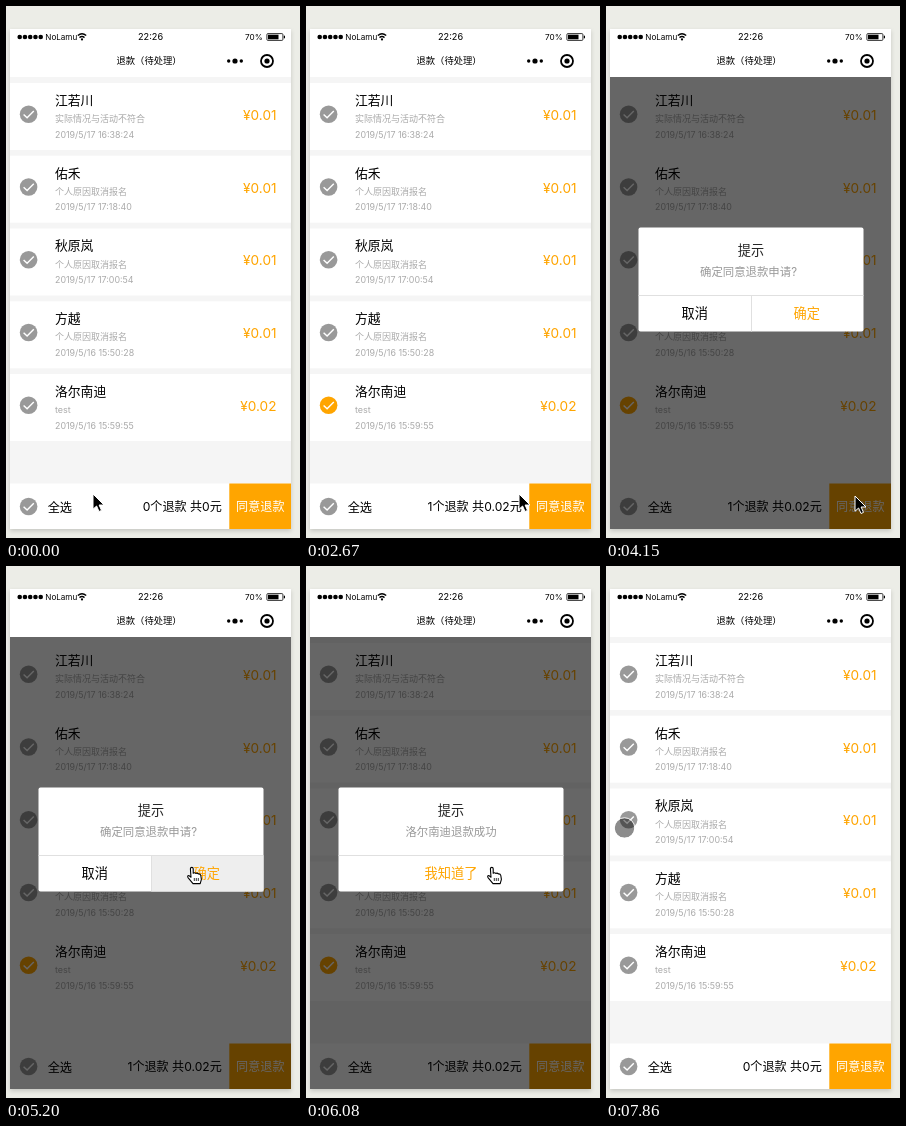
An HTML page that plays this animation: 294x532 px, repeating every 8000 ms.

```html
<!DOCTYPE html>
<html lang="zh-CN">
<head>
<meta charset="utf-8">
<title>退款</title>
<style>
html, body { margin: 0; height: 100%; overflow: hidden; background: #ecede7; }
svg { display: block; width: 294px; height: 532px; }
text { font-family: Inter, "Noto Sans CJK SC", "Noto Sans CJK", sans-serif; white-space: pre; }
#page { filter: drop-shadow(0 2px 2px rgba(0, 0, 0, .16)); }
</style>
</head>
<body>
<svg id="stage" viewBox="0 0 294 532" xmlns="http://www.w3.org/2000/svg"></svg>
<script>
const LOOP = 8000, TICK = 148.15, LAST = 53;
const ORANGE = '#ffa500', GREY = '#999';

const rows = [
  ['江若川', '实际情况与活动不符合', '2019/5/17 16:38:24', '¥0.01'],
  ['佑禾', '个人原因取消报名', '2019/5/17 17:18:40', '¥0.01'],
  ['秋原岚', '个人原因取消报名', '2019/5/17 17:00:54', '¥0.01'],
  ['方越', '个人原因取消报名', '2019/5/16 15:50:28', '¥0.01'],
  ['洛尔南迪', 'test', '2019/5/16 15:59:55', '¥0.02'],
];

// Pointer path: tick, x, y
const path = [
  [0, 87, 488], [1, 86, 488], [2, 86, 488], [3, 86, 486], [9, 25, 398], [10, 24, 396],
  [11, 193.3, 455.3], [13, 214, 484], [18, 213, 488], [20, 213, 488],
  [23, 276, 495], [26, 257, 497], [28, 249, 490], [32, 71, 206], [35, 186, 301],
  [42, 186, 301], [43, 174, 306], [44, 168, 308], [45, 168, 308], [46, 167, 308],
  [49, 167, 308], [53, 18.5, 262],
];

const rect = (x, y, w, h, fill, more = '') =>
  `<rect x="${x}" y="${y}" width="${w}" height="${h}" fill="${fill}" ${more}/>`;
const dot = (x, y, r, fill = '#000', more = '') =>
  `<circle cx="${x}" cy="${y}" r="${r}" fill="${fill}" ${more}/>`;
const label = (s, x, y, size, fill = '#000', anchor = 'start', more = '') =>
  `<text x="${x}" y="${y}" font-size="${size}" fill="${fill}" text-anchor="${anchor}" ${more}>${s}</text>`;
const check = (y, id) => dot(22.6, y, 8.8, GREY, id ? `id="${id}"` : '') +
  `<path d="M17.6 ${y + .2}l3.5 3.4 6.7-6.9" fill="none" stroke="#fff" stroke-width="1.4"/>`;

function statusBar() {
  const signal = [0, 1, 2, 3, 4].map(i => dot(13.7 + i * 5.25, 31, 2.3)).join('');
  const wifi = `<g fill="none" stroke="#000" stroke-width="1.4">
    <path d="M71.8 29.6q4.2-3.8 8.4 0M73.5 31.6q2.5-2.2 5 0"/></g>` + dot(76, 33.4, 1.1);
  const battery = rect(260.9, 27.6, 16, 6.8, 'none', 'stroke="#000" stroke-width=".8" rx="1"') +
    rect(262, 28.7, 10.5, 4.6, '#000') + rect(277.8, 29.7, 1.2, 2.6, '#000');
  return signal + label('NoLamu', 39.3, 33.8, 8.1) + wifi +
    label('22:26', 144.5, 33.8, 9.2, '#000', 'middle') +
    label('70%', 239, 33.8, 8.2) + battery;
}

function titleBar() {
  return label('退款（待处理）', 110.5, 57.7, 9.3) +
    dot(222.7, 55, 1.7) + dot(229, 55, 2.6) + dot(235.3, 55, 1.7) +
    dot(261, 55, 6, 'none', 'stroke="#000" stroke-width="1.8"') + dot(261, 55, 2.6);
}

function row([name, reason, date, price], i) {
  const y = 77 + i * 72.75;
  return rect(4, y, 281, 67, '#fff') +
    check(y + 31.2, i === 4 ? 'pick' : '') +
    label(name, 49, y + 21.8, 12.8) +
    label(reason, 49, y + 39, 9, '#aaa') +
    label(date, 49, y + 54.6, 8.9, '#aaa') +
    label(price, 270.5, y + 36.8, 13.6, ORANGE, 'end');
}

function modal() {
  return `<g id="modal">${rect(4, 71, 281, 452, '#000', 'opacity=".6"')}
    ${rect(32.5, 221.5, 225, 104, '#fff', 'rx="2"')}
    <rect id="pressed" y="290" height="35.5" fill="#eee"/>
    <path d="M32.5 289.5h225" stroke="#e0e0e0"/>
    ${label('提示', 145, 248.5, 13.2, '#222', 'middle')}
    ${label('', 142.5, 270.3, 11.4, GREY, 'middle', 'id="message"')}
    <g id="choice"><path d="M145.5 290v35.5" stroke="#e0e0e0"/>
      ${label('取消', 88.7, 312, 13.2, '#000', 'middle')}
      ${label('确定', 200.7, 312, 13.2, ORANGE, 'middle')}</g>
    ${label('我知道了', 145, 312, 13.3, ORANGE, 'middle', 'id="gotIt"')}</g>`;
}

function toast() {
  let spokes = '';
  for (let i = 0; i < 12; i++)
    spokes += `<path d="M0-6.3V-10.6" transform="rotate(${i * 30})" opacity="${.3 + i * .06}"/>`;
  return `<g id="toast">${rect(107.5, 237.5, 74, 82, '#111', 'rx="3" opacity=".7"')}
    <g transform="translate(144.7 274)"><g id="spinner" stroke="#eee" stroke-width="1.9" stroke-linecap="round">${spokes}</g></g>
    ${label('正在加载....', 144.8, 303.4, 9.6, '#ddd', 'middle')}</g>`;
}

const pointers = `<g id="pointer">
  <g id="touch">${dot(0, 0, 9.8, '#000', 'fill-opacity=".45"')}
    ${dot(0, 0, 10.3, 'none', 'stroke="#fff" stroke-opacity=".8"')}</g>
  <path id="arrow" d="M0 0V15.2L3.6 12 6 17.5 8.5 16.4 6.1 11H11Z" fill="#000" stroke="#fff"/>
  <g id="hand" stroke="#000" stroke-width="1.1" stroke-linejoin="round">
    <path fill="#fff" d="M-1.6 1.8a1.4 1.4 0 0 1 2.8 0V6.2q1.3-1 2.6.2 1.4-.8 2.6.5 2-.2 2.4 1.6l.6 3.9-1.2 4.2H1L-4 10.6q-1-2.2 1-2L-1 10.2Z"/>
    <path d="M2.3 11v3M4.3 11v3M6.3 11v3" stroke-width=".8"/></g>
</g>`;

const stage = document.getElementById('stage');
stage.innerHTML =
  rect(4, 23, 281, 500, '#f5f5f5', 'id="page"') +
  rect(4, 23, 281, 48, '#fff') + statusBar() + titleBar() +
  rows.map(row).join('') +
  rect(4, 477.5, 281, 45.5, '#fff') + check(500.5) + label('全选', 41.7, 505.6, 12.2) +
  label('', 215.8, 505.3, 12.1, '#000', 'end', 'id="total"') +
  rect(223.3, 477.5, 61.7, 45.5, ORANGE) + label('同意退款', 254.3, 505.3, 12.1, '#fff', 'middle') +
  toast() + modal() + pointers;

const el = {};
stage.querySelectorAll('[id]').forEach(node => el[node.id] = node);
const show = (node, on) => node.setAttribute('display', on ? 'inline' : 'none');

function pointerAt(tick) {
  const i = Math.max(1, path.findIndex(p => p[0] >= tick));
  const [t0, x0, y0] = path[i - 1], [t1, x1, y1] = path[i];
  const k = (tick - t0) / (t1 - t0);
  return [x0 + (x1 - x0) * k, y0 + (y1 - y0) * k];
}

function draw(tick) {
  const within = (a, b) => tick >= a && tick < b;
  const asking = within(28, 36), loading = within(36, 41), done = within(41, 50);
  const picked = within(12, 51);
  const [x, y] = pointerAt(tick);

  el.pick.setAttribute('fill', picked ? ORANGE : GREY);
  el.total.textContent = picked ? '1个退款 共0.02元' : '0个退款 共0元';
  el.page.setAttribute('fill', asking ? '#fff' : '#f5f5f5');

  show(el.modal, asking || done);
  show(el.choice, asking);
  show(el.gotIt, done);
  el.message.textContent = asking ? '确定同意退款申请?' : rows[4][0] + '退款成功';
  el.message.setAttribute('x', asking ? 142.5 : 145);
  show(el.pressed, tick === 35 || within(48, 50));
  el.pressed.setAttribute('x', asking ? 146 : 32.5);
  el.pressed.setAttribute('width', asking ? 111.5 : 225);

  show(el.toast, loading);
  el.spinner.setAttribute('transform', `rotate(${Math.floor(tick * TICK / 83.3) * 30})`);

  const onButton = (asking || done) && y > 290 && y < 326 && x > 32 && x < 258;
  const onPage = !asking && !loading && !done && y < 478;
  show(el.hand, onButton);
  show(el.touch, onPage);
  show(el.arrow, !onButton && !onPage);
  el.pointer.setAttribute('transform', `translate(${x} ${y})`);
}

const start = performance.now();
function loop() {
  const time = (performance.now() - start) % LOOP;
  draw(Math.min(LAST, Math.floor((time + 8) / TICK)));
  requestAnimationFrame(loop);
}
loop();
</script>
</body>
</html>
```
